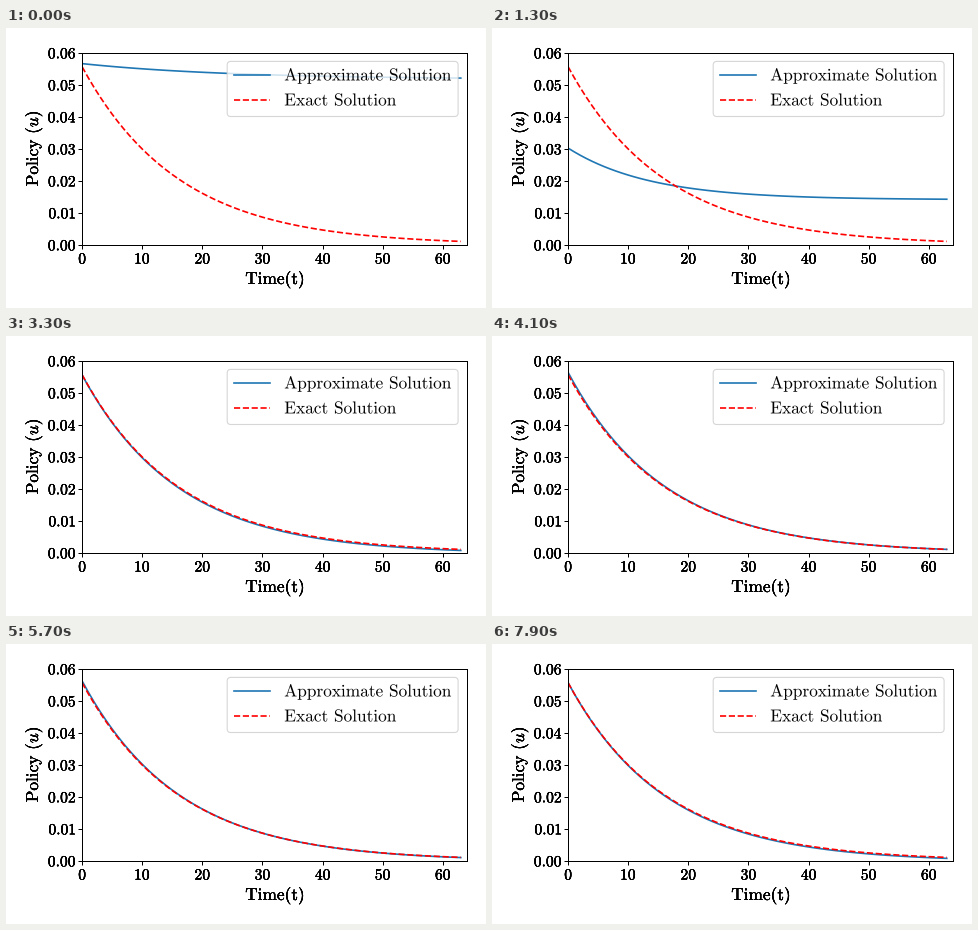
A matplotlib script for the animation above (8000 ms loop, 480 by 280 pixels).

```python
import numpy as np
import matplotlib.pyplot as plt
from matplotlib.animation import FuncAnimation
from matplotlib.lines import Line2D
from matplotlib.patches import FancyBboxPatch, PathPatch
from matplotlib.textpath import TextPath
from matplotlib.transforms import Affine2D

W, H, DPI = 480, 280, 80
FRAMES, STEP = 80, 100
LEFT, RIGHT, TOP, BOTTOM = 76.1, 460.8, 25, 217
LABEL, TICK = 17.3, 15.6
HEAVY = 5
SPACE = r"\hspace{0.38}"

plt.rcParams["mathtext.fontset"] = "cm"

fig = plt.figure(figsize=(W / DPI, H / DPI), dpi=DPI, facecolor="white")
px = Affine2D().scale(1 / DPI) + fig.dpi_scale_trans


def label(text, x, y, size, align="center", rotation=0, passes=1):
    """Typeset text with its baseline at y from the top; more passes look heavier."""
    path = TextPath((0, 0), text, size=size)
    box = path.get_extents()
    anchor = {"left": box.x0, "center": (box.x0 + box.x1) / 2, "right": box.x1}[align]
    place = Affine2D().translate(-anchor, 0).rotate_deg(rotation).translate(x, H - y)
    for _ in range(passes):
        fig.add_artist(PathPatch(path, fc="black", lw=0, snap=False,
                                 transform=place + px, zorder=5))


def roman(text):
    return "$" + SPACE.join(r"\mathrm{%s}" % word for word in text.split()) + "$"


# axes
ax = fig.add_axes([LEFT / W, 1 - BOTTOM / H, (RIGHT - LEFT) / W, (BOTTOM - TOP) / H])
ax.set(xlim=(0, 64), ylim=(0, .06),
       xticks=np.arange(0, 61, 10), yticks=np.arange(7) / 100)
ax.tick_params(labelleft=False, labelbottom=False, width=.9)
for spine in ax.spines.values():
    spine.set_linewidth(.9)

for i in range(7):
    x = LEFT + (RIGHT - LEFT) * 10 * i / 64
    y = BOTTOM - (BOTTOM - TOP) * i / 6
    label(roman(f"{10 * i}"), x, 235.6, TICK, passes=HEAVY)
    label(roman(f"{i / 100:.2f}"), 68.9, y + 5.4, TICK, "right", passes=HEAVY)
label(roman("Time(t)"), (LEFT + RIGHT) / 2, 256, LABEL, passes=HEAVY)
label(r"$\mathrm{Policy}" + SPACE + "(u)$", 32, (TOP + BOTTOM) / 2, LABEL,
      rotation=90, passes=HEAVY)

t = np.arange(64)
approx, = ax.plot(t, 0 * t, color="C0", lw=1.5)
ax.plot(t, .0557 * .94 ** t, "--", color="red", lw=1.5)

# legend
fig.add_artist(FancyBboxPatch((221.2, H - 88.5), 230.9, 55.1,
                              boxstyle="round,pad=0,rounding_size=3.6",
                              fc="white", ec="0.8", lw=1, alpha=.8,
                              transform=px, zorder=3))
for y, text, color, style in [(47, "Approximate Solution", "C0", "-"),
                              (72, "Exact Solution", "red", "--")]:
    fig.add_artist(Line2D([228.3, 263.9], [H - y] * 2, color=color, ls=style,
                          lw=1.5, transform=px, zorder=4))
    label(roman(text), 278.8, y + 5.5, LABEL, "left")


def bump(s, center, width, power=2):
    return np.exp(-abs((s - center) / width) ** power)


def policy(s):
    """Approximate policy after s seconds of training."""
    first = bump(s, 0, .3)
    settle = bump(s, 4.9, 1.2, 4)
    ripple = .0038 * bump(s, 2.2, .6, 1) * np.cos(2 * np.pi * (s - 2.2) / .64)
    start = .0557 + .0013 * first - .029 * bump(s, 1.1, .5) + .0007 * settle + ripple
    end = (.0521 * first + .0147 * bump(s, 1.3, .35)
           - .0003 * (1 - settle) + .35 * ripple)
    rate = .062 - .022 * first + .012 * bump(s, 1.3, .4)
    return end + (start - end) * np.exp(-rate * t)


def update(frame):
    approx.set_ydata(policy(frame * STEP / 1000))
    return approx,


anim = FuncAnimation(fig, update, frames=FRAMES, interval=STEP, repeat=True)
plt.show()
```
